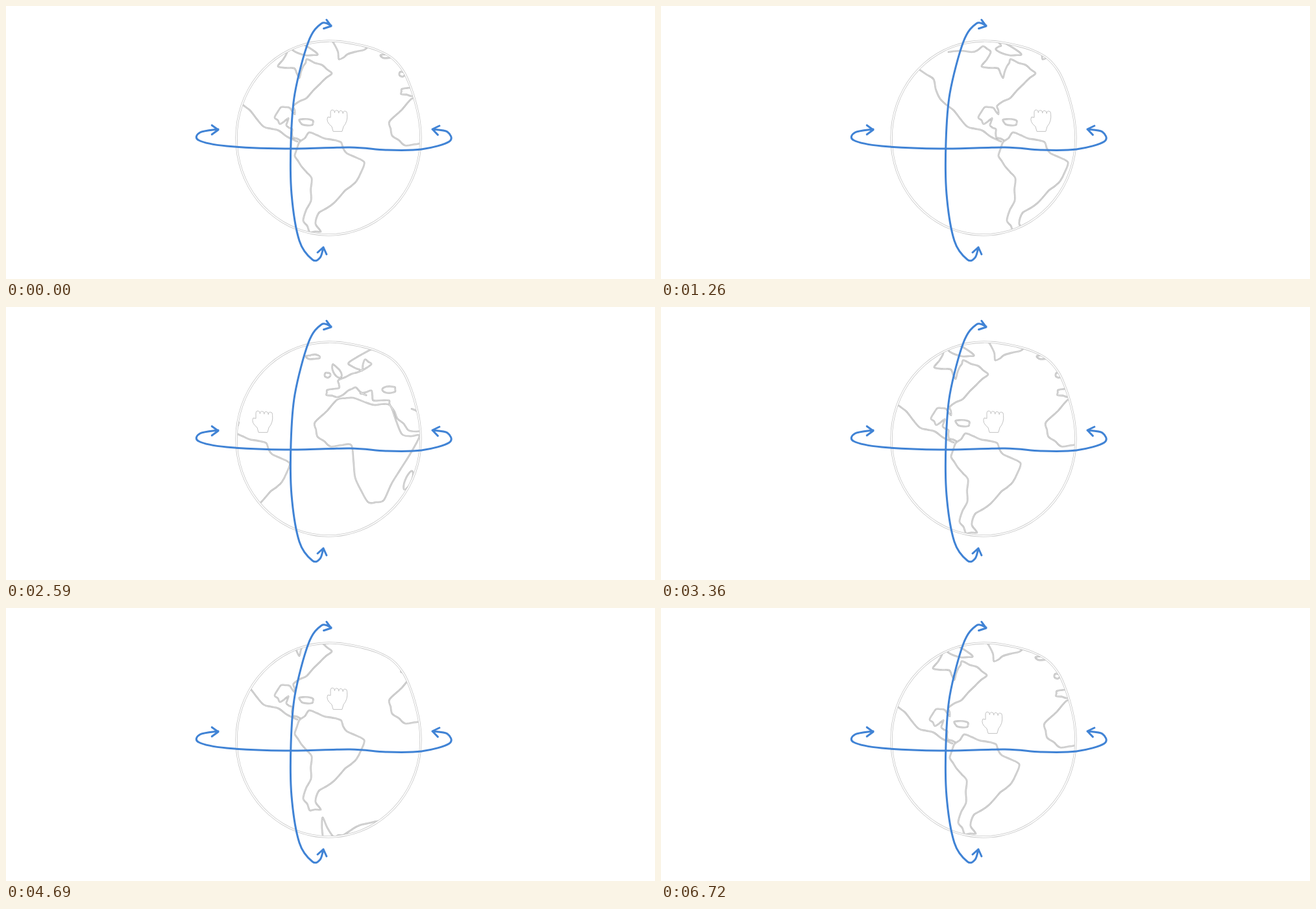
An HTML page that plays this animation: 1000x421 px, repeating every 6.79 s.

```html
<!DOCTYPE html>
<html lang="en">
<head>
<meta charset="utf-8">
<title>Draggable globe</title>
<style>
  html, body { margin: 0; width: 100%; height: 100%; overflow: hidden; background: #fff; }
  svg { display: block; width: 100vw; height: 100vh; }
  path { fill: none; stroke-linecap: round; stroke-linejoin: round; }
  .edge { stroke: #b8b8b8; stroke-width: 2.6; }
  .core { stroke: #ebebeb; stroke-width: .9; }
  .rim { stroke: #c8c8c8; stroke-width: 3.4; }
  .rim-core { stroke: #fff; stroke-width: 1.8; }
  .hand { fill: #fff; stroke: #c2c2c2; }
  .arrow { stroke: #4083d5; stroke-width: 3; }
</style>
</head>
<body>
<svg viewBox="0 0 1000 421">
  <clipPath id="disc"><path id="discShape"/></clipPath>
  <g clip-path="url(#disc)"><g id="map"></g></g>
  <g id="rim"></g>
  <g id="arrows"></g>
</svg>
<script>
const LOOP = 6790, STEP = 70, TAU = 2 * Math.PI;
const $ = id => document.getElementById(id);
const points = text => text.split(" ").map(p => p.split(",").map(Number));
const ring = (count, pointAt) => Array.from({ length: count }, (_, i) => pointAt(i / count * TAU));

let seed = 7;
function random() {
  seed = seed * 16807 % 2147483647;
  return seed / 2147483647;
}

// Catmull-Rom curve through the points
function curve(pts, closed) {
  const n = pts.length;
  const at = i => closed ? pts[(i + n) % n] : pts[Math.max(0, Math.min(n - 1, i))];
  let d = "M" + pts[0];
  for (let i = 0; i < (closed ? n : n - 1); i++) {
    const [a, b, c, e] = [at(i - 1), at(i), at(i + 1), at(i + 2)];
    const c1 = b.map((v, k) => v + (c[k] - a[k]) / 6);
    const c2 = c.map((v, k) => v - (e[k] - b[k]) / 6);
    d += `C${c1} ${c2} ${c}`;
  }
  return closed ? d + "Z" : d;
}

// Coast with a small sideways wobble between its key points
function coast(text, closed) {
  const pts = points(text);
  const rough = pts.flatMap(([x, y], i) => {
    const next = pts[i + 1] || (closed && pts[0]);
    if (!next) return [[x, y]];
    const dx = next[0] - x, dy = next[1] - y;
    const shift = (random() - .5) * Math.min(.2, 4 / Math.hypot(dx, dy));
    return [[x, y], [x + dx / 2 - dy * shift, y + dy / 2 + dx * shift]];
  });
  return curve(rough, closed);
}

function island(cx, cy, rx, ry, degrees = 0) {
  const turn = degrees * TAU / 360, cos = Math.cos(turn), sin = Math.sin(turn);
  return curve(ring(9, a => {
    const r = .85 + .3 * random(), x = rx * r * Math.cos(a), y = ry * r * Math.sin(a);
    return [cx + x * cos - y * sin, cy + x * sin + y * cos];
  }), true);
}

// Ellipse with a slight bulge at the upper right
const globe = curve(ring(36, a => {
  const away = (a - TAU + .83) / .33, r = 1 + .075 * Math.exp(-away * away);
  return [497 + 142 * r * Math.cos(a), 203.5 + 149.5 * r * Math.sin(a)];
}), true);

const land = [
  // North America: Atlantic side and gulf, then Pacific side
  coast("368,71 404,71 421,62 433,71 419,93 444,96 452,111 458,93 464,82 487,91 502,104 " +
        "484,120 463,142 443,154 445,167 437,157 424,156 414,172 422,182 435,173 432,184 " +
        "441,190 442,203 453,207"),
  coast("323,98 345,113 355,143 376,161 397,186 420,192 449,209"),
  // South America
  coast("452,210 467,195 490,204 516,210 525,227 552,241 540,270 523,284 505,304 483,318 " +
        "477,336 485,348 468,349 458,331 470,300 471,266 455,247 445,231", true),
  // Antarctica
  coast("488,388 488,360 505,390 520,387 545,372 595,362"),
  // Europe
  coast("678,65 643,86 655,95 664,98 668,81 678,88 663,98 648,103 627,113 628,125 610,128 " +
        "609,136 625,139 642,129 654,124 670,136 661,133 678,129 681,144 705,144 707,152"),
  // Africa and Arabia
  coast("707,152 682,151 650,140 625,143 591,178 595,200 615,215 647,213 653,263 673,301 " +
        "697,298 723,250 752,199 725,196", true),
  coast("707,152 718,172 735,190 760,190"),
  coast("740,157 753,164"),
  // Greenland and the Arctic
  coast("492,43 537,35 573,45 553,67 527,74 513,82 507,61", true),
  coast("397,49 420,40 468,38 440,46 408,54", true),
  coast("441,51 480,74 462,76 441,67 449,61", true),
  island(463, 179, 11, 5, 8),
  island(589, 77, 11, 3.5),
  island(610, 105, 4.5, 4),
  island(624, 99, 11, 5, 55),
  island(706, 127, 10, 5),
  island(735, 267, 14, 5, 115)
].join("");

const knuckles = "a3.2 4 0 0 1 6.4 .6".repeat(4);
const hand = `M504 193L502 186Q492 178 496 171L500 172V164${knuckles}Q527 178 520 186L518 193Z`;

function arrowHead(x, y, degrees) {
  const [a, b] = [-36, 36].map(spread => {
    const angle = (degrees + spread) * TAU / 360;
    return [x + 12 * Math.cos(angle), y + 12 * Math.sin(angle)];
  });
  return `M${a}L${x} ${y}L${b}`;
}

const arrows = [
  curve(points("501,30 486,27 466,55 445,135 439,210 440,290 452,362 472,391 484,388 489,372")),
  curve(points("327,190 299,195 297,207 340,216 430,220 530,218 585,222 640,221 683,209 680,194 657,190")),
  arrowHead(501, 31, 198), arrowHead(489, 372, 102),
  arrowHead(327, 191, 180), arrowHead(657, 190, 10)
].join("");

function addPath(parent, d, className) {
  const path = document.createElementNS("http://www.w3.org/2000/svg", "path");
  path.setAttribute("d", d);
  path.setAttribute("class", className);
  $(parent).append(path);
}

$("discShape").setAttribute("d", globe);
addPath("map", land, "edge");
addPath("map", land, "core");
addPath("map", hand, "hand");
addPath("rim", globe, "rim");
addPath("rim", globe, "rim-core");
addPath("arrows", arrows, "arrow");

// Drag positions: [time, offset], eased between stops
const dragX = [[0, 0], [1100, 81], [2500, -118], [3360, 2], [4400, 0], [LOOP, 0]];
const dragY = [[0, 0], [3400, 0], [4400, -52], [5600, 57], [LOOP, 0]];

function ease(stops, t) {
  const i = stops.findIndex(stop => stop[0] > t);
  const [t0, v0] = stops[i - 1], [t1, v1] = stops[i];
  return v0 + (v1 - v0) * (1 - Math.cos(Math.PI * (t - t0) / (t1 - t0))) / 2;
}

function draw() {
  const t = Math.floor(performance.now() % LOOP / STEP) * STEP;
  const x = Math.round(ease(dragX, t)), y = Math.round(ease(dragY, t));
  $("map").setAttribute("transform", `translate(${x} ${y})`);
  requestAnimationFrame(draw);
}
draw();
</script>
</body>
</html>
```
